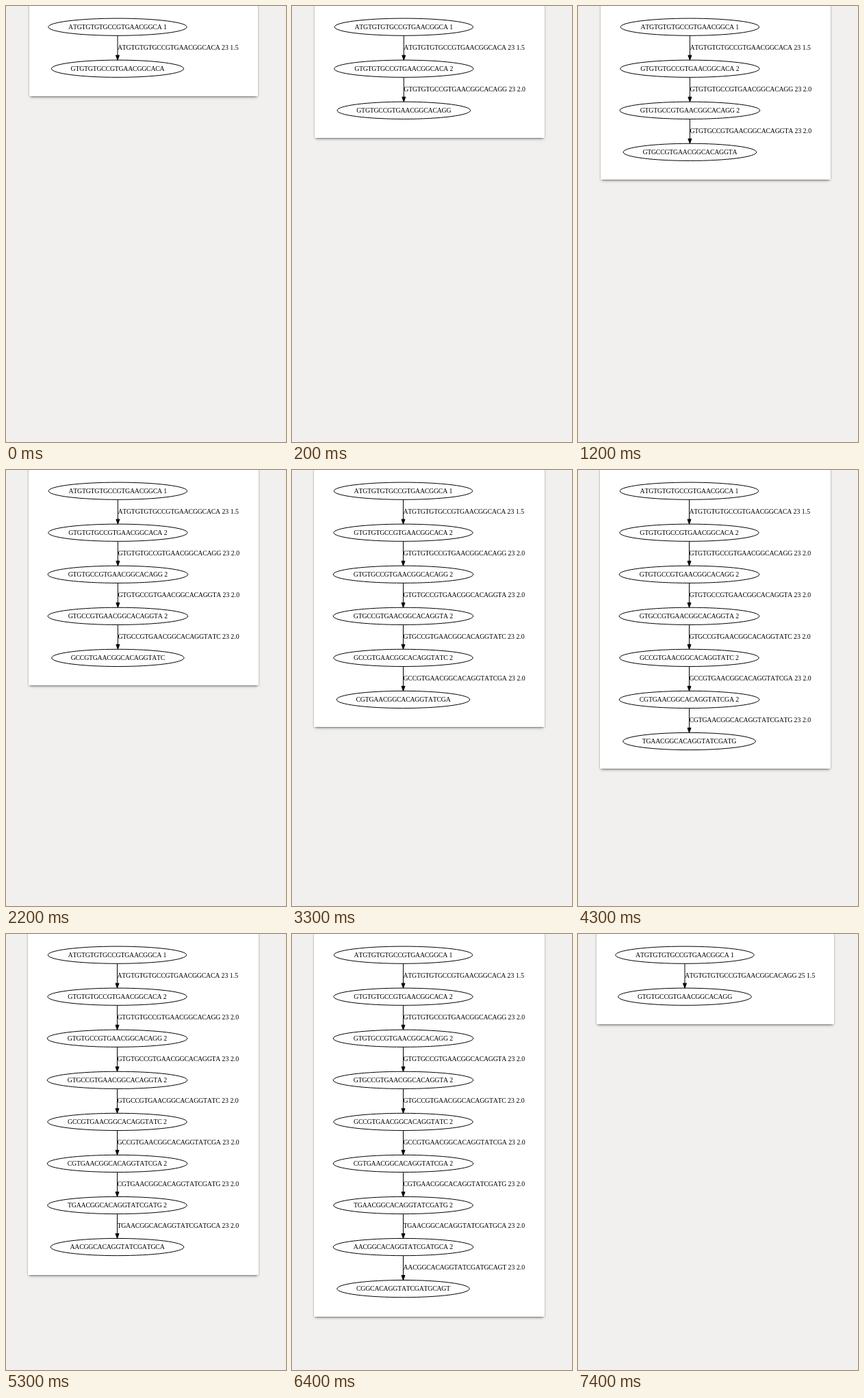
An HTML page that plays this animation: 409 px wide and 638 px high, repeating every 8 s.

```html
<!DOCTYPE html>
<html lang="en">
<head>
<meta charset="utf-8">
<title>Sequence graph</title>
<style>
html, body { margin: 0; width: 100%; height: 100%; overflow: hidden; background: #f1f0ee; }
#page {
  position: absolute; top: -20px; background: #fff;
  box-shadow: 0 0 2px rgba(0,0,0,.3), 0 3px 4px -2px rgba(0,0,0,.55);
}
svg { position: absolute; left: 0; top: 0; display: block; }
text {
  font: 9.85px "Liberation Serif", "Times New Roman", serif;
  font-kerning: none; letter-spacing: -.25px; fill: #000;
}
.num { letter-spacing: 0; }
ellipse, line { fill: none; stroke: #000; stroke-width: 1; }
</style>
</head>
<body>
<div id="page"></div>
<svg id="graph" width="409" height="638" viewBox="0 0 409 638"></svg>
<script>
const SEQ = 'ATGTGTGTGCCGTGAACGGCACAGGTATCGATGCAGT';
const LOOP = 8000, TOP = 30.7, STEP = 61.05, RY = 12.6, NODE = 21;
const RX = [101.2, 101.6, 102.3, 102.3, 101.7, 102.3, 101.8, 102.3, 101.7];

// skip: letters dropped from one node to the next
const STATES = [
  { at: 0,    count: 2, skip: 2, left: 34, right: 368,   cx: 163 },
  { at: 100,  count: 3, skip: 2, left: 33, right: 368.7, cx: 163.3 },
  { at: 1200, count: 4, skip: 2, left: 33, right: 369,   cx: 163.4 },
  { at: 2200, count: 5, skip: 2, left: 33, right: 369,   cx: 163.4 },
  { at: 3300, count: 6, skip: 2, left: 32, right: 369,   cx: 162.5 },
  { at: 4300, count: 7, skip: 2, left: 32, right: 369,   cx: 162.5 },
  { at: 5300, count: 8, skip: 2, left: 32, right: 369,   cx: 162.5 },
  { at: 6400, count: 9, skip: 2, left: 32, right: 369,   cx: 162.5 },
  { at: 7400, count: 2, skip: 4, left: 27, right: 374,   cx: 156 }
];

const page = document.getElementById('page');
const graph = document.getElementById('graph');

const label = (x, y, letters, num, anchor) =>
  `<text x="${x}" y="${y + 2.8}" text-anchor="${anchor}">${letters}` +
  `<tspan class="num">${num}</tspan></text>`;

function node(s, i) {
  const y = TOP + i * STEP, start = i * s.skip;
  const last = i === s.count - 1;
  const rx = RX[start / 2] - (last ? 5 : 0);
  const num = last ? '' : i ? ' 2' : ' 1';
  return `<ellipse cx="${s.cx}" cy="${y}" rx="${rx}" ry="${RY}"/>` +
    label(s.cx, y, SEQ.slice(start, start + NODE), num, 'middle');
}

function edge(s, i) {
  const y = TOP + i * STEP, tip = y + STEP - RY, x = s.cx;
  const start = i * s.skip, len = NODE + s.skip;
  const num = ` ${len} ${i ? '2.0' : '1.5'}`;
  return `<line x1="${x}" y1="${y + RY}" x2="${x}" y2="${tip - 7}"/>` +
    `<path d="M${x - 2.5} ${tip - 7}h5L${x} ${tip}z" stroke="#000"/>` +
    label(x, y + STEP / 2, SEQ.slice(start, start + len), num, 'start');
}

function draw(s) {
  page.style.left = s.left + 'px';
  page.style.width = s.right - s.left + 'px';
  page.style.height = 152.2 + (s.count - 2) * STEP + 'px';
  let out = '';
  for (let i = 0; i < s.count; i++) {
    out += node(s, i);
    if (i < s.count - 1) out += edge(s, i);
  }
  graph.innerHTML = out;
}

let shown = null;
function update(ms) {
  const t = ms % LOOP;
  const state = STATES.filter(s => s.at <= t).pop();
  if (state !== shown) draw(shown = state);
}

const begin = performance.now();
function tick() {
  update(performance.now() - begin);
  requestAnimationFrame(tick);
}
tick();
</script>
</body>
</html>
```
